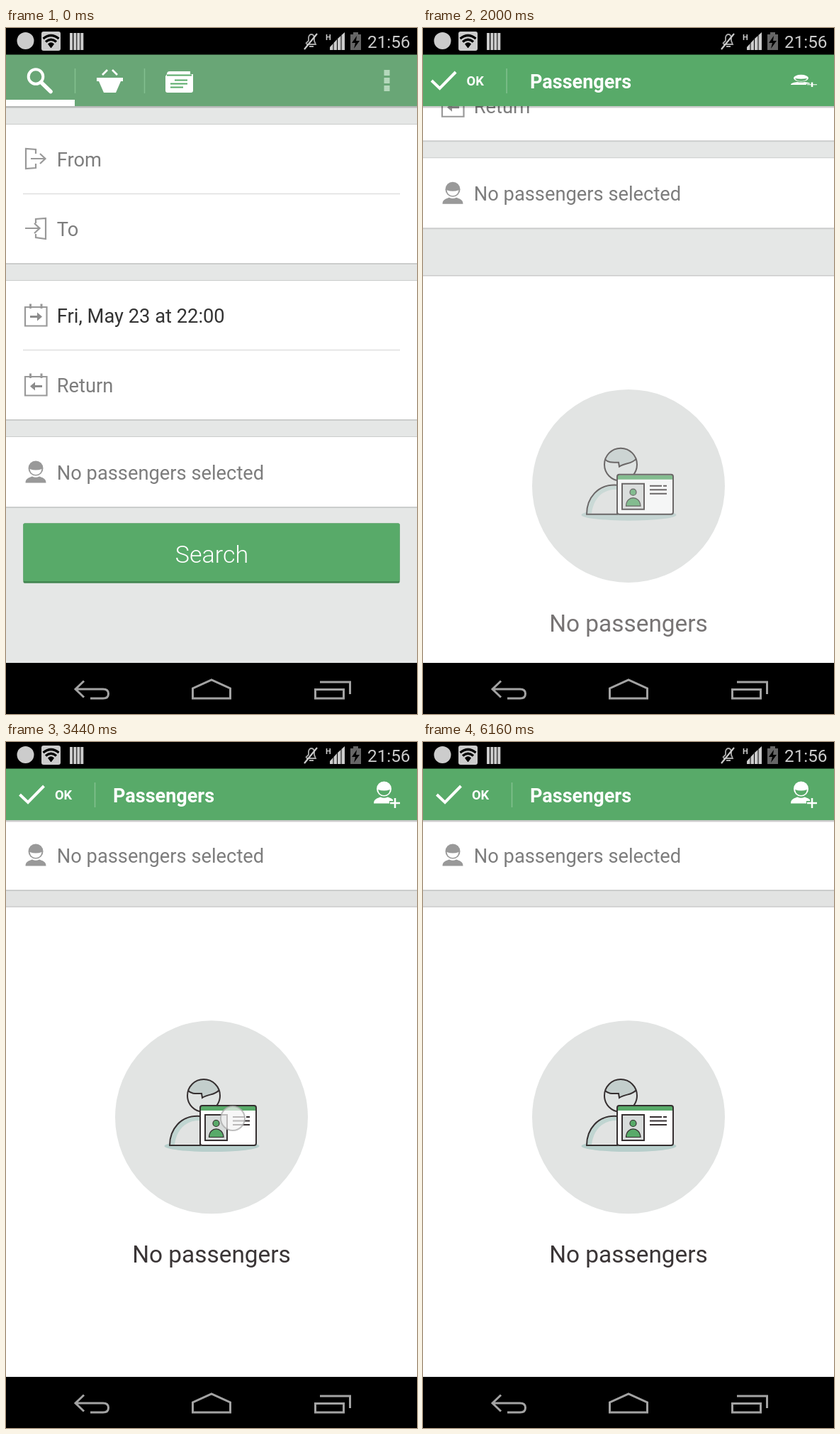
An HTML page that plays this animation: 580 by 966 pixels, repeating every 9.24 s.

```html
<!DOCTYPE html>
<html lang="en">
<head>
<meta charset="utf-8">
<title>Passenger picker</title>
<style>
html, body { margin: 0; width: 580px; height: 966px; overflow: hidden; }
svg { display: block; font-family: Roboto, sans-serif; }
.row { font-size: 27.3px; fill: #7d7d7d; }
.line { fill: none; stroke: #999; stroke-width: 2.2; }
.white { fill: none; stroke: #fff; }
.ink { stroke: #352f30; stroke-width: 2; }
.face { fill: var(--face); }
</style>
</head>
<body>
<svg width="580" height="966" viewBox="0 0 580 966">
  <defs>
    <g id="person">
      <ellipse cx="0" cy="-5" rx="10.500" ry="10.500"/>
      <path d="M-14.500 15.500C-14.500 9-9 8-5 6.500Q0 9 5 6.500C9 8 14.500 9 14.500 15.500Z"/>
      <path class="face" d="M-8.500-4Q0-1 8.500-4Q7 4 0 4T-8.500-4Z"/>
    </g>
    <g id="calendar" class="line">
      <path d="M27 393H57.500V419.500H27Z"/>
      <path d="M34.500 388.500V395M50 388.500V395" stroke-width="3"/>
    </g>
  </defs>

  <rect id="ground" width="580" height="966"/>

  <g id="form">
    <g id="cards"></g>
    <path d="M24 233.500H556M24 453.500H556" stroke="#dedede" stroke-width="1.500"/>
    <g class="line">
      <path d="M42 177V171L28 170V198L42 197V191M35 184H55M48 177L55.500 184L48 191"/>
      <path d="M42 275V269L56 268V297L42 295V290M27 282H47M40 275L47.500 282L40 289"/>
    </g>
    <use href="#calendar"/>
    <use href="#calendar" y="98"/>
    <path d="M34 405H44V400.500L51 406.500L44 412.500V408H34Z" fill="#8c8c8c"/>
    <path d="M51 503H41V498.500L34 504.500L41 510.500V506H51Z" fill="#8c8c8c"/>
    <use href="#person" x="42" y="625" fill="#999" style="--face:#fff"/>
    <g class="row">
      <text x="71.800" y="194.500">From</text>
      <text x="71.800" y="293">To</text>
      <text x="71.800" y="415" fill="#333">Fri, May 23 at 22:00</text>
      <text x="71.800" y="513">Return</text>
      <text x="71.800" y="635.500">No passengers selected</text>
    </g>
    <g id="search">
      <rect x="24.400" y="697.500" width="531.200" height="84.300" rx="2" fill="#438651"/>
      <rect x="24.400" y="697.500" width="531.200" height="81.500" rx="2" fill="#58aa69"/>
      <text x="290.500" y="752.500" text-anchor="middle" font-size="34" font-weight="300" fill="#fff">Search</text>
    </g>
  </g>

  <g id="panel">
    <rect y="232" width="580" height="740" fill="#fff"/>
    <path d="M0 232H580" stroke="#cbcbcb" stroke-width="1.500"/>
    <circle cx="290" cy="528.300" r="136" fill="#e2e4e3"/>
    <g id="empty">
      <ellipse cx="290.500" cy="569" rx="67" ry="8" fill="#b7cecb"/>
      <path d="M231 568C231 546 246 525 274 527V568Z" fill="#e1e3e2"/>
      <path d="M232 567C232 546 246 527 273 528V533C250 533 240 550 238 567Z" fill="#c0d5d1"/>
      <path class="ink" d="M231 568C231 546 246 525 274 527V568Z" fill="none"/>
      <circle cx="279" cy="498" r="23" fill="#dfe3e2"/>
      <path d="M257 491A23 23 0 0 1 301 490C294 498 286 495 277 501L276 495C268 495 262 496 257 491Z" fill="#c3cecc"/>
      <path class="ink" d="M257 491C262 496 268 495 276 495L277 501C286 495 294 498 301 490" fill="none"/>
      <circle class="ink" cx="279" cy="498" r="23" fill="none"/>
      <rect x="274" y="512" width="79" height="56" rx="3" fill="#fff"/>
      <path d="M275 513H352V519H275Z" fill="#58aa69"/>
      <rect class="ink" x="274" y="512" width="79" height="56" rx="3" fill="none"/>
      <path class="ink" d="M281 525H312V561H281Z" fill="#d8dcdb"/>
      <g fill="#58aa69" stroke="#352f30" stroke-width="1.200">
        <circle cx="296.500" cy="537" r="4.500"/>
        <path d="M286.500 556.500C287 541 306 541 307 556.500Z"/>
      </g>
      <path class="ink" d="M320 528H337M339 528H344M320 533.500H344M320 539H344" fill="none"/>
      <text x="290" y="733" text-anchor="middle" font-size="33.400" fill="#3a3536">No passengers</text>
    </g>
  </g>

  <rect y="110" width="580" height="2.500" fill="#000" opacity=".2"/>
  <rect id="bar" y="37" width="580" height="73"/>
  <g id="tabs">
    <rect y="101" width="97" height="9" fill="#fff"/>
    <path d="M97.500 57V92M195.500 57V92" stroke="#83c08f" stroke-width="1.500"/>
    <circle class="white" cx="42" cy="68.500" r="10.300" stroke-width="4"/>
    <path class="white" d="M49.500 76.500L63 89.500" stroke-width="5.500" stroke-linecap="round"/>
    <path d="M128 70H165V75H162L155 91H138L131 75H128Z" fill="#fff"/>
    <path class="white" d="M136 66L143 59M157 66L150 59" stroke-width="2.800"/>
    <path d="M227 65Q227 61 231 61H260V65H264V88Q264 91 261 91H228Q225 91 225 88V68Z" fill="#fff"/>
    <path d="M227 66.500H262M238 73.500H256M232 78.500H256M232 83.500H250" stroke="#58aa69" stroke-width="2"/>
    <path d="M533.500 59h8v8h-8ZM533.500 70h8v8h-8ZM533.500 81h8v8h-8Z" fill="#b5d8bc"/>
  </g>
  <g id="title" fill="#fff" font-weight="700">
    <g id="done">
      <path class="white" d="M19.500 74L31 85L53.500 62" stroke-width="4"/>
      <text x="69" y="81" font-size="18.300">OK</text>
      <path d="M125.500 57V92" stroke="#83c08f" stroke-width="1.500"/>
    </g>
    <text x="151" y="84.500" font-size="27">Passengers</text>
    <g id="add">
      <use href="#person" x="533.500" y="71" style="--face:#58aa69"/>
      <path d="M549 78V93M541 86H556" stroke="#58aa69" stroke-width="6"/>
      <path class="white" d="M549 79V93M542 86H556" stroke-width="2.500"/>
    </g>
  </g>

  <rect width="580" height="37.500"/>
  <g fill="#ccc">
    <circle cx="27.500" cy="18" r="12"/>
    <rect x="50" y="5" width="27" height="27" rx="3"/>
    <path d="M90 7h4v24h-4ZM95.300 7h4v24h-4ZM100.300 7h4v24h-4ZM105.300 7h4v24h-4Z"/>
    <path d="M423 22L427 18V13Q428 9 431 9T435 13V18L437 23H424M428 26H434" fill="none" stroke="#aaa" stroke-width="1.800"/>
    <path d="M421 30L439 8" stroke="#ccc" stroke-width="2.200"/>
    <path d="M457 31V27L461.500 22V31ZM462.500 31V21L467 16V31ZM468 31V15L472.500 11V31ZM473.500 31V10L478 6V31Z"/>
    <path d="M490 6H497V9H501V31H486V9H490Z" fill="#666"/>
    <path d="M495 11L488 21H493L491 29L499 18H494Z" fill="#000"/>
    <text x="451" y="17" font-size="11" font-weight="700">H</text>
    <text x="510" y="28" font-size="24.300">21:56</text>
  </g>
  <g fill="none" stroke="#000" stroke-width="3.200">
    <path d="M52.500 15Q63.500 6 74.500 15M56 19.500Q63.500 13 71 19.500"/>
    <path d="M59.500 22.500Q63.500 19 67.500 22.500L63.500 28Z" fill="#000" stroke-width="1"/>
  </g>

  <rect y="894" width="580" height="72"/>
  <g fill="none" stroke="#a3a3a3" stroke-width="3">
    <path d="M110 919.500L98 931L110 942.500M98 931H137Q144.500 931 144.500 937.500T137 944H119"/>
    <path d="M263.500 944V930L290 918L316.500 930V944Z"/>
    <path d="M436.500 931.500H476.500V944H436.500ZM443 921H485.500V938"/>
  </g>

  <circle id="touch" r="17" fill="#f4f4f4" fill-opacity=".7" stroke="#aaa" stroke-opacity=".75" stroke-width="2"/>
</svg>
<script>
const LOOP = 9240;
const $ = id => document.getElementById(id);
const clamp = v => Math.min(1, Math.max(0, v));
const ramp = (t, start, length) => clamp((t - start) / length);
const set = (id, name, value) => $(id).setAttribute(name, value);

const taps = [[1760, 200, 625], [3440, 320, 530], [5120, 296, 538]];
const scales = [1, .9, .9, 1.1, 1.1, 1.1, 1.1, 1.1, 1.1, 1];
const angles = [0, -3, -3, 3, -3, 3, -3, 3, -3, 0];

$('cards').innerHTML = [[136, 195], [356, 195], [576, 98]].map(([y, h]) =>
  `<rect y="${y - 1}" width="580" height="${h + 3}" fill="#cbcdcc"/>
   <rect y="${y}" width="580" height="${h}" fill="#fff"/>`).join('');

// Linear interpolation through evenly spaced keys
function keyed(keys, u) {
  const k = u * (keys.length - 1), i = Math.min(Math.floor(k), keys.length - 2);
  return keys[i] + (keys[i + 1] - keys[i]) * (k - i);
}

function draw(t) {
  const p = 1 - (1 - ramp(t, 1800, 400)) ** 2.65;
  set('form', 'transform', `translate(0 ${-466 * p})`);
  set('panel', 'transform', `translate(0 ${742 * (1 - p)})`);
  set('search', 'opacity', clamp(1 - 1.4 * p));
  set('empty', 'opacity', clamp(2 * p - 1));
  set('ground', 'fill', t < 2040 ? '#e5e7e6' : '#e2e3e2');
  set('bar', 'fill', t < 1760 ? '#69a676' : '#58aa69');

  const swap = ramp(t, 1800, 120);
  set('tabs', 'opacity', 1 - swap);
  set('title', 'opacity', swap);
  set('done', 'transform', `translate(${-47 * (1 - p)} 0)`);

  // The add button flips in, then wiggles after each tap on the empty state
  const flip = Math.sin(ramp(t, 1914, 286) * Math.PI / 2);
  const wiggle = ramp(t, t < 5000 ? 3440 : 5150, 1000);
  const eased = (1 - Math.cos(Math.PI * wiggle)) / 2;
  const size = keyed(scales, eased);
  set('add', 'transform', `translate(538 74.500) rotate(${keyed(angles, eased)})
    scale(${size} ${size * flip}) translate(-538 -74.500)`);

  const [start, x, y] = taps.findLast(tap => t >= tap[0]) || [-LOOP, 0, 0];
  set('touch', 'transform', `translate(${x} ${y})`);
  set('touch', 'opacity', 1 - ramp(t, start + 80, 120));
}

const begin = performance.now();
function tick() {
  draw((performance.now() - begin) % LOOP);
  requestAnimationFrame(tick);
}
tick();
</script>
</body>
</html>
```
